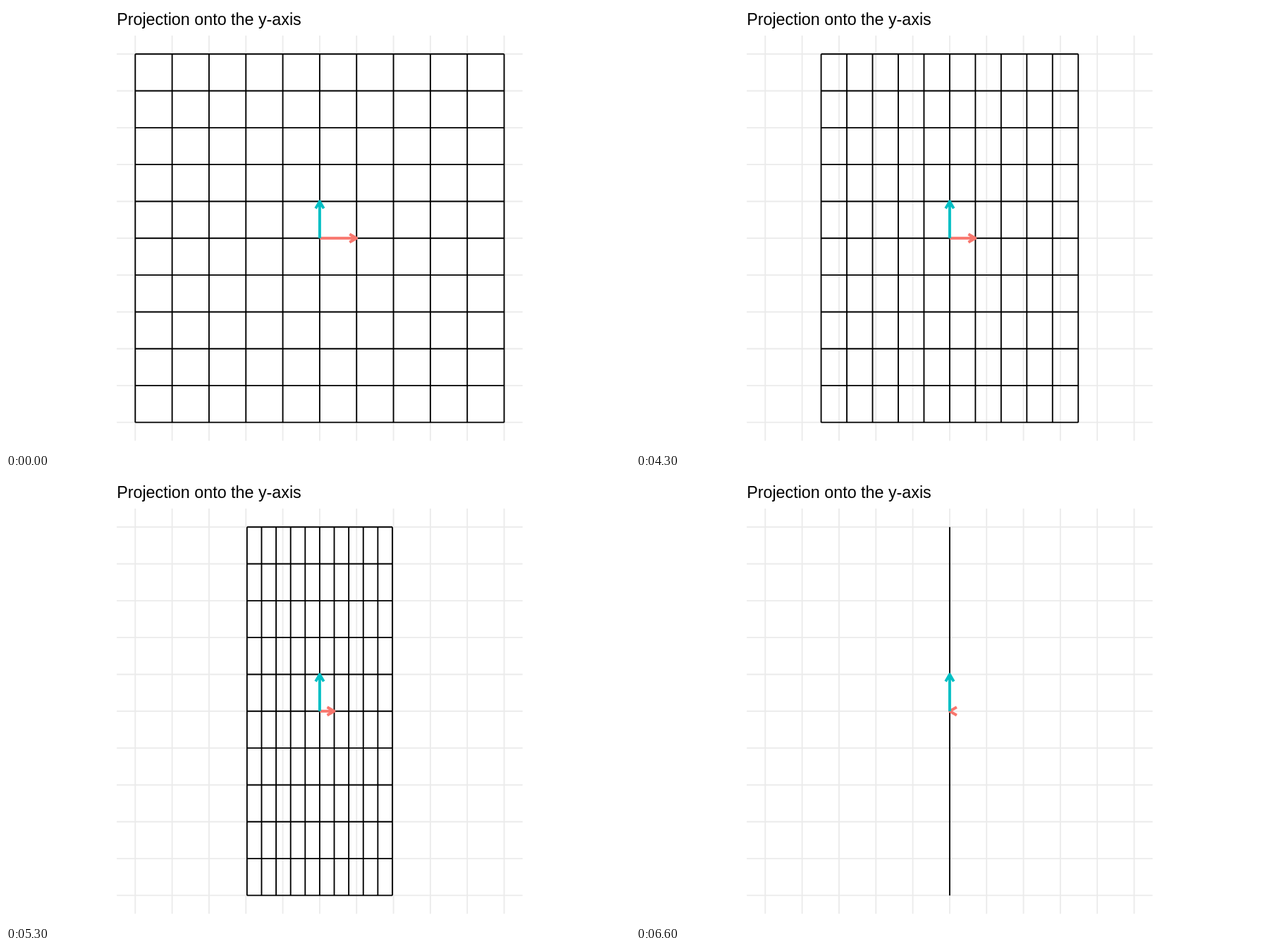
An HTML page that plays this animation: 885 by 632 pixels, repeating every 10000 ms.

```html
<!DOCTYPE html>
<html lang="en">
<head>
<meta charset="utf-8">
<title>Projection onto the y-axis</title>
<style>
  html, body { margin: 0; width: 100%; height: 100%; overflow: hidden; background: #fff; }
  svg { display: block; width: 885px; height: 632px; }
  path { fill: none; stroke-width: 1.87; }
  .arrow { stroke-width: 3.9; stroke-linejoin: round; }
  text { font: 23.3px "Liberation Sans", Arial, sans-serif; }
</style>
</head>
<body>
<svg viewBox="0 0 885 632">
  <text x="157.2" y="27">Projection onto the y-axis</text>
  <path id="back" stroke="#ebebeb"/>
  <path id="grid" stroke="#000"/>
  <path id="xArrow" class="arrow" stroke="#f8766d"/>
  <path id="yArrow" class="arrow" stroke="#00bfc4"/>
</svg>
<script>
const LOOP = 10000, START = 3400, STEP = 100, STEPS = 33;
const CX = 444.9, CY = 329.8, UNIT = 52.32, HEAD = 11.5;
const el = id => document.getElementById(id);

// Lines at -5..5 in both directions, squeezed horizontally by sx.
function gridPath(sx, reach) {
  let d = "";
  const w = reach * UNIT * sx, h = reach * UNIT;
  for (let i = -5; i <= 5; i++) {
    const x = CX + i * UNIT * sx, y = CY + i * UNIT;
    d += `M${x} ${CY - h}V${CY + h}`;
    if (w) d += `M${CX - w} ${y}H${CX + w}`;
  }
  return d;
}

function arrowPath(dx, dy) {
  const tipX = CX + dx, tipY = CY + dy;
  // A collapsed arrow keeps its head, pointing left.
  const dir = dx || dy ? Math.atan2(dy, dx) : Math.PI;
  const barb = turn => {
    const a = dir + Math.PI + turn;
    return `${tipX + HEAD * Math.cos(a)} ${tipY + HEAD * Math.sin(a)}`;
  };
  const shaft = dx || dy ? `M${CX} ${CY}L${tipX} ${tipY}` : "";
  return `${shaft}M${barb(Math.PI / 6)}L${tipX} ${tipY}L${barb(-Math.PI / 6)}`;
}

function draw(ms) {
  const step = Math.floor((ms % LOOP - START) / STEP) + 1;
  const sx = 1 - Math.min(STEPS, Math.max(0, step)) / STEPS;
  el("grid").setAttribute("d", gridPath(sx, 5));
  el("xArrow").setAttribute("d", arrowPath(UNIT * sx, 0));
}

el("back").setAttribute("d", gridPath(1, 5.5));
el("yArrow").setAttribute("d", arrowPath(0, -UNIT));

const begin = performance.now();
function tick() {
  draw(performance.now() - begin);
  requestAnimationFrame(tick);
}
tick();
</script>
</body>
</html>
```
